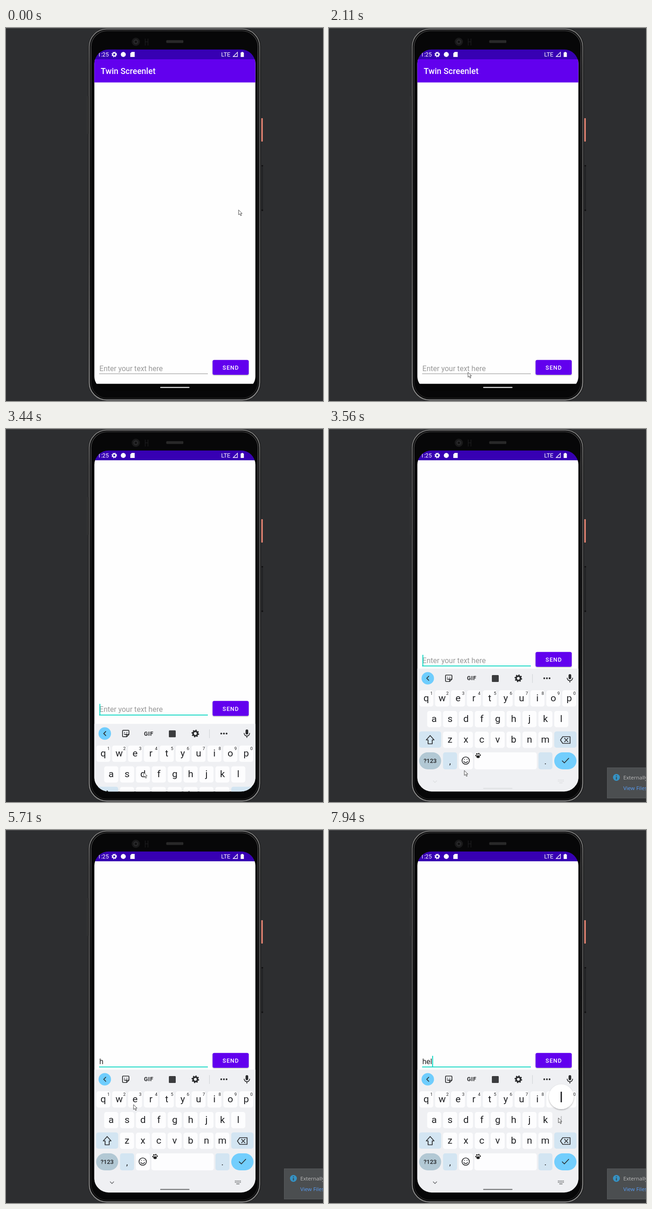
An HTML page that plays this animation: 691 by 811 pixels, repeating every 8000 ms.

```html
<!DOCTYPE html>
<html lang="en">
<head>
<meta charset="utf-8">
<title>Phone keyboard</title>
<style>
  html, body { margin: 0; width: 100%; height: 100%; overflow: hidden; background: #2d2e30; }
  svg { display: block; width: 691px; height: 811px; font-family: Roboto, sans-serif; }
  .mid { text-anchor: middle; }
  .bold { font-weight: 500; }
  .line { fill: none; stroke: #2a2b2d; stroke-width: 1.7; stroke-linejoin: round; stroke-linecap: round; }
</style>
</head>
<body>
<svg viewBox="0 0 691 811">
  <defs>
    <clipPath id="screenClip"><rect x="192.6" y="46.7" width="351" height="741.5" rx="31"/></clipPath>
    <clipPath id="pageClip"><rect x="192" y="68" width="352" height="705.6"/></clipPath>
    <linearGradient id="metal" x2="0" y2="1">
      <stop stop-color="#777"/><stop offset=".1" stop-color="#5a5a5a"/>
      <stop offset=".6" stop-color="#5c5c5c"/><stop offset="1" stop-color="#858585"/>
    </linearGradient>
    <linearGradient id="sheen" x2="0" y2="1">
      <stop stop-color="#3a3a3a"/><stop offset=".08" stop-color="#5a5a5a"/>
      <stop offset=".4" stop-color="#1c1c1c"/><stop offset="1" stop-color="#242424"/>
    </linearGradient>
    <pattern id="mesh" width="3" height="6" patternUnits="userSpaceOnUse">
      <rect width="3" height="6" fill="#191919"/><rect width="1.4" height="6" fill="#3a3a3a"/>
    </pattern>
    <filter id="soft" x="-30%" y="-30%" width="160%" height="170%">
      <feDropShadow dx="0" dy="1.5" stdDeviation="1.8" flood-opacity=".32"/>
    </filter>
    <filter id="low" x="-10%" y="-10%" width="120%" height="140%">
      <feDropShadow dx="0" dy="1.2" stdDeviation="1" flood-opacity=".3"/>
    </filter>
  </defs>

  <rect width="691" height="811" fill="#2d2e30"/>
  <rect width="691" height="1" fill="#505254"/>

  <!-- phone body -->
  <path d="M178 148V230" stroke="#4a4b4c" stroke-width="1.2"/>
  <path d="M179.2 148V230" stroke="#161616" stroke-width="1.4"/>
  <path d="M558.6 298V398" stroke="#222325" stroke-width="3"/>
  <path d="M558.6 298V301M558.6 394.5V398" stroke="#121213" stroke-width="3.4"/>
  <rect x="556.5" y="196" width="3.2" height="51" rx="1" fill="#ed8876"/>
  <rect x="179.3" y=".8" width="376.2" height="809.7" rx="40" fill="#131313"/>
  <rect x="181.4" y="2.4" width="371.6" height="806.4" rx="38" fill="#070708" stroke="url(#metal)" stroke-width="2.4"/>
  <rect x="185.4" y="6" width="363.8" height="799" rx="35" fill="none" stroke="url(#sheen)" stroke-width="1.4"/>
  <circle cx="283" cy="30" r="9" fill="#19191a"/>
  <circle cx="283" cy="30" r="5.3" fill="#29292b"/>
  <circle cx="283" cy="30" r="2.6" fill="#111"/>
  <path d="M303.5 23V38M309.5 23V38M304 30H309" fill="none" stroke="#1a1a1b" stroke-width="1.6"/>
  <rect x="349" y="26.5" width="38" height="6" rx="2" fill="url(#mesh)"/>

  <g clip-path="url(#screenClip)">
    <rect x="192" y="46" width="352" height="743" fill="#050505"/>
    <rect x="192" y="68" width="352" height="705.6" fill="#fefefe"/>
    <rect x="336" y="780.4" width="64" height="2" rx="1" fill="#fff"/>

    <g clip-path="url(#pageClip)"><g id="page">
      <rect x="192" y="68" width="352" height="50.4" fill="#6200ee"/>
      <text class="bold" x="206.5" y="100" font-size="17.86" letter-spacing=".1" fill="#fff">Twin Screenlet</text>
      <text id="entry" x="203.5" y="745.5" font-size="16.07"></text>
      <rect id="underline" x="203" width="237"/>
      <rect id="caret" y="728" width="2" height="24" fill="#13d8c4"/>
      <rect x="450.3" y="721.7" width="78.8" height="32.4" rx="3.6" fill="#6200ee" filter="url(#low)"/>
      <text class="bold" x="472" y="743.2" font-size="12.5" letter-spacing="1.12" fill="#fff">SEND</text>
    </g></g>

    <!-- status bar -->
    <rect x="192" y="46" width="352" height="22" fill="#3700b3"/>
    <g fill="#fff">
      <text x="199.5" y="62.4" font-size="12.8">1:25</text>
      <g id="statusGear"></g>
      <circle cx="255.7" cy="57.5" r="5.4"/>
      <path d="M274 52H280.5V63H271V55Z"/>
      <text x="469" y="62.2" font-size="12.8">LTE</text>
      <path d="M495.3 62H504.5V52.8Z" fill="none" stroke="#fff" stroke-width="1.3"/>
      <path d="M513.5 52H516.5V53.2H518.5V63H511.5V53.2H513.5Z"/>
    </g>

    <g id="keyboard">
      <rect x="192" y="521" width="352" height="268" fill="#eff0f3"/>
      <circle cx="215.3" cy="542" r="13.6" fill="#6fcdfd"/>
      <path class="line" d="M217.5 537.5L213 542L217.5 546.5"/>
      <path class="line" d="M255.5 535H266.5Q268 535 268 536.5V544L263 549H255.5Q254 549 254 547.5V536.5Q254 535 255.5 535ZM263 549V544H268M258 543Q260 546 262.5 543M258.5 539.5V540M263.5 539.5V540"/>
      <text class="mid" x="311" y="546.4" font-size="12.5" font-weight="700" letter-spacing=".5" fill="#2a2b2d">GIF</text>
      <rect x="355" y="535" width="15" height="15" rx="1.5" fill="#3b3c3e"/>
      <g id="toolGear"></g>
      <path d="M443.5 533V552" stroke="#cfd1d4"/>
      <g fill="#2a2b2d">
        <circle cx="469.2" cy="542" r="1.9"/><circle cx="475" cy="542" r="1.9"/><circle cx="480.8" cy="542" r="1.9"/>
        <rect x="522.2" y="533" width="5.8" height="11" rx="2.9"/>
      </g>
      <path class="line" d="M519.2 541.5A5.9 5.9 0 0 0 531 541.5M525.1 547.5V550.5"/>
      <g id="keys"></g>

      <path class="line" d="M220.5 666.5L229 676H225V684.5H216V676H212Z"/>
      <path class="line" d="M509.5 669H525.5V683.5H509.5L504.5 676.2ZM513.5 672.5L520.8 680M520.8 672.5L513.5 680"/>
      <circle class="line" cx="298" cy="721" r="8"/>
      <path class="line" d="M294 723Q298 728 302 723M295.2 718.3V718.5M300.8 718.3V718.5"/>
      <path class="line" d="M508.5 721.5L513 726L522.5 716"/>
      <g fill="#222">
        <ellipse cx="325" cy="712.4" rx="3.7" ry="3"/>
        <circle cx="320.3" cy="710" r="1.6"/><circle cx="322.5" cy="706.5" r="1.7"/>
        <circle cx="326.6" cy="706" r="1.7"/><circle cx="329.6" cy="709" r="1.6"/>
      </g>
      <g id="nav" stroke="#66686a" fill="none">
        <path d="M226.8 764.5L231 768.7L235.2 764.5" stroke-width="1.4"/>
        <path d="M499 763.2H512M499 766.2H512" stroke-width="1.7" stroke-dasharray="1.7 1.1"/>
        <path d="M502 769.5H509" stroke-width="1.5"/>
        <path d="M337 781.4H399" stroke-width="2" stroke-linecap="round"/>
      </g>
      <g id="popup">
        <circle r="27" fill="#fff" filter="url(#soft)"/>
        <text class="mid" id="popupLetter" y="11.5" font-size="31" fill="#202124"></text>
      </g>
    </g>
  </g>

  <g id="notice">
    <rect x="606.5" y="736.5" width="100" height="66" fill="#4b4e50" stroke="#56595b"/>
    <circle cx="626.5" cy="757.5" r="7.5" fill="#3592c4"/>
    <path d="M626.5 753V754.8M626.5 756.4V762" stroke="#3d4548" stroke-width="2"/>
    <g font-family="'Open Sans', sans-serif" font-size="11.6">
      <text x="641.5" y="762" fill="#bbb">Externally added</text>
      <text x="641.5" y="785" fill="#589df6">View Files</text>
    </g>
  </g>

  <path id="pointer" d="M0 .5V11.2L2.5 9L4.5 13.2L6.3 12.4L4.4 8.3H7.7Z" fill="#fff" stroke="#333" stroke-width=".9"/>
</svg>

<script>
const LOOP = 8000;
const $ = id => document.getElementById(id);
const show = (id, on) => $(id).setAttribute('visibility', on ? 'visible' : 'hidden');
const place = (id, x, y) => $(id).setAttribute('transform', `translate(${x} ${y})`);

// A ring with eight teeth
const gear = (x, y, r, color) => {
  const tooth = Math.PI * r * 1.7 / 16;
  return `<g fill="none" stroke="${color}">
    <circle cx="${x}" cy="${y}" r="${r * .58}" stroke-width="${r * .42}"/>
    <circle cx="${x}" cy="${y}" r="${r * .85}" stroke-width="${r * .3}" stroke-dasharray="${tooth}"/></g>`;
};

const letterKeys = {};
const keyBox = (x, y, w, color = '#fdfdfe', r = 5, h = 35.5) =>
  `<rect x="${x}" y="${y}" width="${w}" height="${h}" rx="${r}" fill="${color}"/>`;
const label = (x, y, size, text, extra = '') =>
  `<text class="mid" x="${x}" y="${y}" font-size="${size}" fill="#202124" ${extra}>${text}</text>`;

function letterRow(letters, firstX, top, digits = '') {
  return [...letters].map((c, i) => {
    const x = firstX + i * 34.63;
    letterKeys[c] = { x, y: top + 17 };
    const digit = digits ? label(x + 11.5, top + 10, 9.5, digits[i]) : '';
    return `<g id="box-${c}">${keyBox(x - 15.3, top, 30.6)}</g>
      <g id="letter-${c}">${label(x, top + 24, 21, c)}</g>${digit}`;
  }).join('');
}

const PALE = '#d3e5f2';
$('keys').innerHTML =
  letterRow('qwertyuiop', 212, 568, '1234567890') +
  letterRow('asdfghjkl', 229.3, 613) +
  letterRow('zxcvbnm', 263.8, 658) +
  keyBox(196.5, 657.5, 48, PALE) + keyBox(491, 657.5, 48.5, PALE) +
  keyBox(196.5, 703, 48, '#b2c8d4', 18.5, 37) + keyBox(248.5, 703, 30.6, PALE, 5, 37) +
  keyBox(283, 703, 30.6, undefined, 5, 37) + keyBox(317, 703, 136, undefined, 5, 37) +
  keyBox(456.5, 703, 30.6, PALE, 5, 37) + keyBox(491, 703, 48.5, '#72cefd', 18.5, 37) +
  label(220.5, 726, 13, '?123', 'font-weight="500"') +
  label(263.8, 729, 19, ',') + label(471.8, 729, 19, '.');
$('statusGear').innerHTML = gear(236, 57.5, 6, '#fff');
$('toolGear').innerHTML = gear(412.7, 542, 8.3, '#2a2b2d');

// Each entry holds from its start time until the next: [ms, ...state]
const at = (steps, t) => steps.findLast(step => step[0] <= t);

const pointerSteps = [
  [0, 507, 395], [370, 494, 372], [490, 440, 310], [610, 340, 215], [730, 214, 150], [850, 230, 115],
  [970, 310, 108], [1090, 388, 107], [1210, 385, 140], [1330, 367, 203], [1450, 303, 546],
  [1600, 303, 559], [1750, 300, 610], [1870, 298, 680], [1990, 300, 730], [2110, 303, 748],
  [3440, 300, 746], [3560, 295, 742], [3830, 297, 738], [3950, 305, 725], [4070, 325, 700],
  [4190, 350, 670], [4320, 375, 645], [4440, 390, 630], [4560, 396, 624], [4680, 398, 624.5],
  [5350, 385, 619], [5470, 345, 606], [5590, 300, 598], [5710, 278, 596.5],
  [6690, 330, 604], [6810, 434, 611], [6960, 470, 620], [7080, 495, 624], [7200, 500, 625.5]
];
const typedSteps = [[0, ''], [5070, 'h'], [6450, 'he'], [7690, 'hel']];
const pressSteps = [[0, ''], [4920, 'h'], [5070, ''], [6330, 'e'], [6450, ''], [7440, 'l'], [7690, ''], [7940, 'l']];
const caretSteps = [[0, 0], [2390, 1], [3190, 0], [3440, 1], [3950, 0], [4440, 1], [5590, 0], [6080, 1], [6960, 0], [7440, 1]];
const keyboardSteps = [[0, 0], [3440, .55], [3560, 1]];

function draw(t) {
  const [, px, py] = at(pointerSteps, t);
  const typed = at(typedSteps, t)[1];
  const pressed = at(pressSteps, t)[1];
  const open = at(keyboardSteps, t)[1];
  const focused = t >= 2390;

  place('pointer', px, py);
  place('page', 0, -237 * open);
  place('keyboard', 0, 267 * (1 - open));
  show('keyboard', open > 0);
  show('notice', t >= 3560);
  $('nav').setAttribute('opacity', t < 3680 ? .12 : t < 3830 ? .5 : 1);

  const entry = $('entry');
  entry.textContent = typed || 'Enter your text here';
  entry.setAttribute('fill', typed ? '#222' : '#999');
  const typedWidth = typed ? entry.getComputedTextLength() : 0;
  $('caret').setAttribute('x', 203.6 + typedWidth);
  show('caret', at(caretSteps, t)[1]);

  const underline = $('underline');
  underline.setAttribute('y', 751.3);
  underline.setAttribute('height', focused ? 1.9 : 1);
  underline.setAttribute('fill', focused ? '#13d8c4' : '#8b8b8b');

  for (const c of 'hel') {
    $('box-' + c).setAttribute('opacity', c === pressed ? 0 : 1);
    $('letter-' + c).setAttribute('opacity', c === pressed ? .25 : 1);
  }
  $('popup').style.display = pressed ? '' : 'none';
  if (pressed) {
    place('popup', letterKeys[pressed].x, letterKeys[pressed].y - 50);
    $('popupLetter').textContent = pressed;
  }
}

const start = performance.now();
function frame() {
  draw((performance.now() - start) % LOOP);
  requestAnimationFrame(frame);
}
frame();
</script>
</body>
</html>
```
